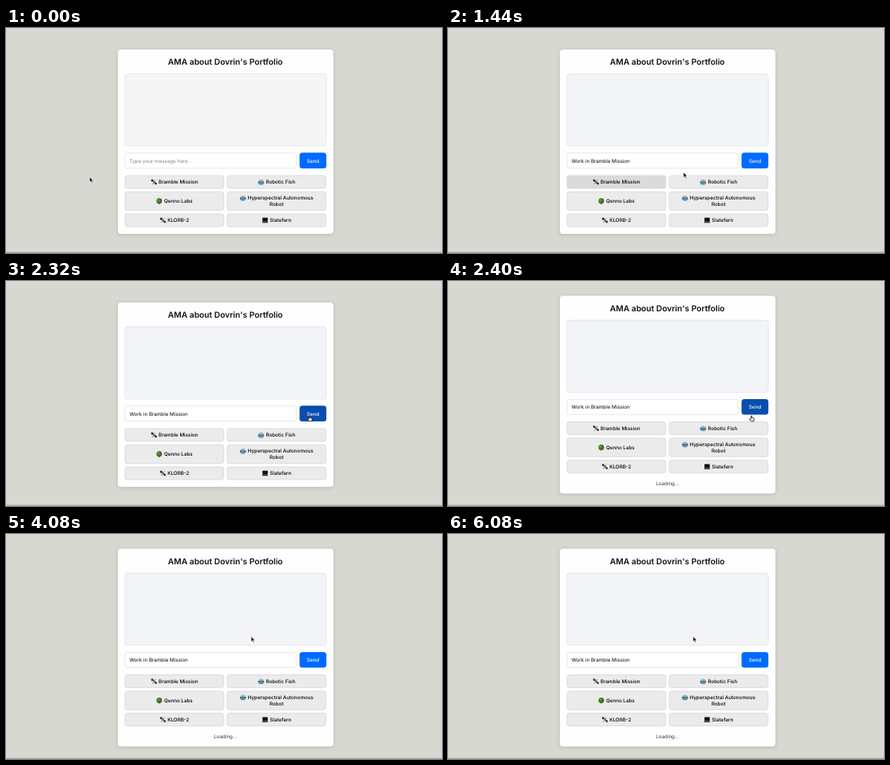
An HTML page that plays this animation: 546 px wide and 282 px high, repeating every 8 s.

```html
<!DOCTYPE html>
<html lang="en">
<head>
<meta charset="utf-8">
<title>Portfolio chat</title>
<style>
html, body { margin: 0; width: 100%; height: 100%; overflow: hidden; background: #d8d8d2; }
svg { display: block; }
text { font: 6.25px Inter, "Liberation Sans", sans-serif; fill: #000; text-rendering: geometricPrecision; }
.mid { text-anchor: middle; }
#title { font-size: 10.25px; font-weight: 600; fill: #111; }
#card { fill: #fefefe; filter: drop-shadow(0 1.5px 2.5px rgba(0, 0, 0, .14)); }
#input { fill: #fff; stroke: #dededf; stroke-width: .7; }
#chat { stroke: #dfe1e6; stroke-width: .7; }
.btn { fill: #ebebec; stroke: #d3d3d4; stroke-width: .7; }
#buttons text { font-weight: 450; }
</style>
</head>
<body>
<svg width="546" height="282" viewBox="0 0 546 282">
  <defs>
    <g id="satellite">
      <path d="M.3 1.2 2.8.6 4 3 1.6 4zM4.8 5.2 7 4.3 8.3 6.6 6 7.4z" fill="#292750"/>
      <path d="M2.9 3.2 5 2.4 6 5 4 5.7z" fill="#5d5864"/>
      <path d="M3.4 5.4 2.4 7M5 2.4 6.2 1.6" stroke="#44425c" stroke-width=".7"/>
    </g>
    <g id="robot">
      <path d="M.4 4Q.8.8 4 .8T7.6 4z" fill="#9db4bd"/>
      <rect x=".2" y="3.4" width="7.6" height="2.4" rx=".8" fill="#3d5a69"/>
      <path d="M1 5h6v1.5q-.2 1-1.2 1H2.2q-1 0-1.2-1z" fill="#4f95ab"/>
      <path d="M2 4.3h1.2M4.8 4.3H6" stroke="#d5e2e6" stroke-width=".8"/>
    </g>
    <g id="tree">
      <path d="M4 5v3" stroke="#5e4326" stroke-width="1.3"/>
      <circle cx="4" cy="3.8" r="3.5" fill="#3f6f22"/>
      <circle cx="3" cy="3" r="1.7" fill="#649a37"/>
    </g>
    <g id="laptop">
      <rect x=".9" y=".8" width="6.6" height="5" rx=".5" fill="#111114"/>
      <path d="M.9 6h6.5l.6 1.3H.2z" fill="#3d3e42"/>
    </g>
  </defs>
  <rect width="546" height="282" fill="#d8d8d2"/>
  <rect y="280.6" width="546" height="1.4" fill="#a9a9a7"/>
  <g id="panel">
    <rect id="card" x="140" y="27" width="270" height="231" rx="4"/>
    <text id="title" class="mid" x="274.7" y="46">AMA about Dovrin's Portfolio</text>
    <rect id="chat" x="149" y="57.5" width="252" height="90.3" rx="3"/>
    <rect id="input" x="149" y="156.7" width="214.5" height="19" rx="3"/>
    <text id="typed" x="154.7" y="168.8"></text>
    <rect id="send" x="367.6" y="156.3" width="33.6" height="19.6" rx="3.5"/>
    <text class="mid" x="384.5" y="168.8" style="fill:#fff;font-weight:500">Send</text>
    <g id="buttons"></g>
    <text id="loading" class="mid" x="274.8" y="264" style="fill:#333">Loading...</text>
  </g>
  <path id="arrow" d="M0 0v6.3l1.5-1.3 1.1 2.5 1.1-.5-1.1-2.4h2z" fill="#111" stroke="#fff" stroke-width=".5"/>
  <path id="hand" d="M-.6.6Q0 0 .6.6V2.8L2.8 3.3Q3.6 3.6 3.4 4.4L2.9 7.2H-.4L-2.4 4.8Q-2.4 3.8-.7 4.6z" fill="#fff" stroke="#111" stroke-width=".8"/>
</svg>
<script>
const $ = id => document.getElementById(id);
const LOOP = 8000, STEP = 80;

// icon, label lines, x, y, height
const buttons = [
  ["satellite", ["Bramble Mission"], 149, 185, 16],
  ["robot", ["Robotic Fish"], 277, 185, 16],
  ["tree", ["Qenno Labs"], 149, 205.3, 23.4],
  ["robot", ["Hyperspectral Autonomous", "Robot"], 277, 205.3, 23.4],
  ["satellite", ["KLORB-2"], 149, 233, 16],
  ["laptop", ["Slatefern"], 277, 233, 16],
];

function add(name, attrs, text = "") {
  const el = document.createElementNS("http://www.w3.org/2000/svg", name);
  for (const k in attrs) el.setAttribute(k, attrs[k]);
  el.textContent = text;
  return $("buttons").appendChild(el);
}

for (const [icon, lines, x, y, height] of buttons) {
  add("rect", { class: "btn", x, y, width: 123.7, height, rx: 3 });
  const cx = x + 61.8, base = y + height / 2 + 2.3 - (lines.length - 1) * 3.9;
  lines.forEach((line, i) => {
    const lx = cx + (i ? 0 : 5);
    const label = add("text", { class: "mid", x: lx, y: base + i * 7.8 }, line);
    if (i) return;
    const left = lx - label.getComputedTextLength() / 2 - 10;
    add("use", { href: "#" + icon, transform: `translate(${left} ${base - 6.3})` });
  });
}
const firstButton = document.querySelector(".btn");

const progress = (t, a, b) => Math.min(1, Math.max(0, (t - a) / (b - a)));
const ease = u => u * u * (3 - 2 * u);
const mix = (a, b, u) => a + (b - a) * u;
const blend = (a, b, u) => `rgb(${a.map((v, i) => Math.round(mix(v, b[i], u)))})`;

// start, end, x, y
const moves = [[240, 960, 253, 187], [1040, 2080, 380, 168.6], [3040, 3360, 307, 128.6]];

function pointer(t) {
  let x = 104.8, y = 186.8;
  for (const [a, b, mx, my] of moves) {
    const u = ease(progress(t, a, b));
    x = mix(x, mx, u);
    y = mix(y, my, u);
  }
  return [x, y];
}

function draw(t) {
  const waiting = t >= 2400, filled = t >= 1040;
  const [x, y] = pointer(t);
  const onButton = x > 149 && x < 273 && y > 185 && y < 201;
  const onSend = x > 368 && y < 176;

  $("panel").setAttribute("transform", `translate(0 ${waiting ? -8.4 : 0})`);
  $("card").setAttribute("height", waiting ? 247.7 : 231);
  $("loading").style.display = waiting ? "" : "none";
  $("chat").style.fill = t < 160 ? "#f5f5f6" : "#f3f4f8";

  $("typed").textContent = filled ? "Work in Bramble Mission" : "Type your message here...";
  $("typed").style.fill = filled ? "#000" : "#858585";

  const hover = progress(t, 480, 720) - progress(t, 1280, 1680);
  firstButton.style.fill = blend([235, 235, 236], [209, 209, 210], hover);
  const pressed = progress(t, 2000, 2300) - progress(t, 2400, 2700);
  $("send").style.fill = blend([0, 107, 255], [8, 78, 174], pressed);

  const hand = onButton || onSend;
  $("hand").style.display = hand ? "" : "none";
  $("arrow").style.display = hand ? "none" : "";
  $(hand ? "hand" : "arrow").setAttribute("transform", `translate(${x} ${y})`);
}

function frame(now) {
  draw(Math.floor(now % LOOP / STEP) * STEP);
  requestAnimationFrame(frame);
}
draw(0);
requestAnimationFrame(frame);
</script>
</body>
</html>
```
